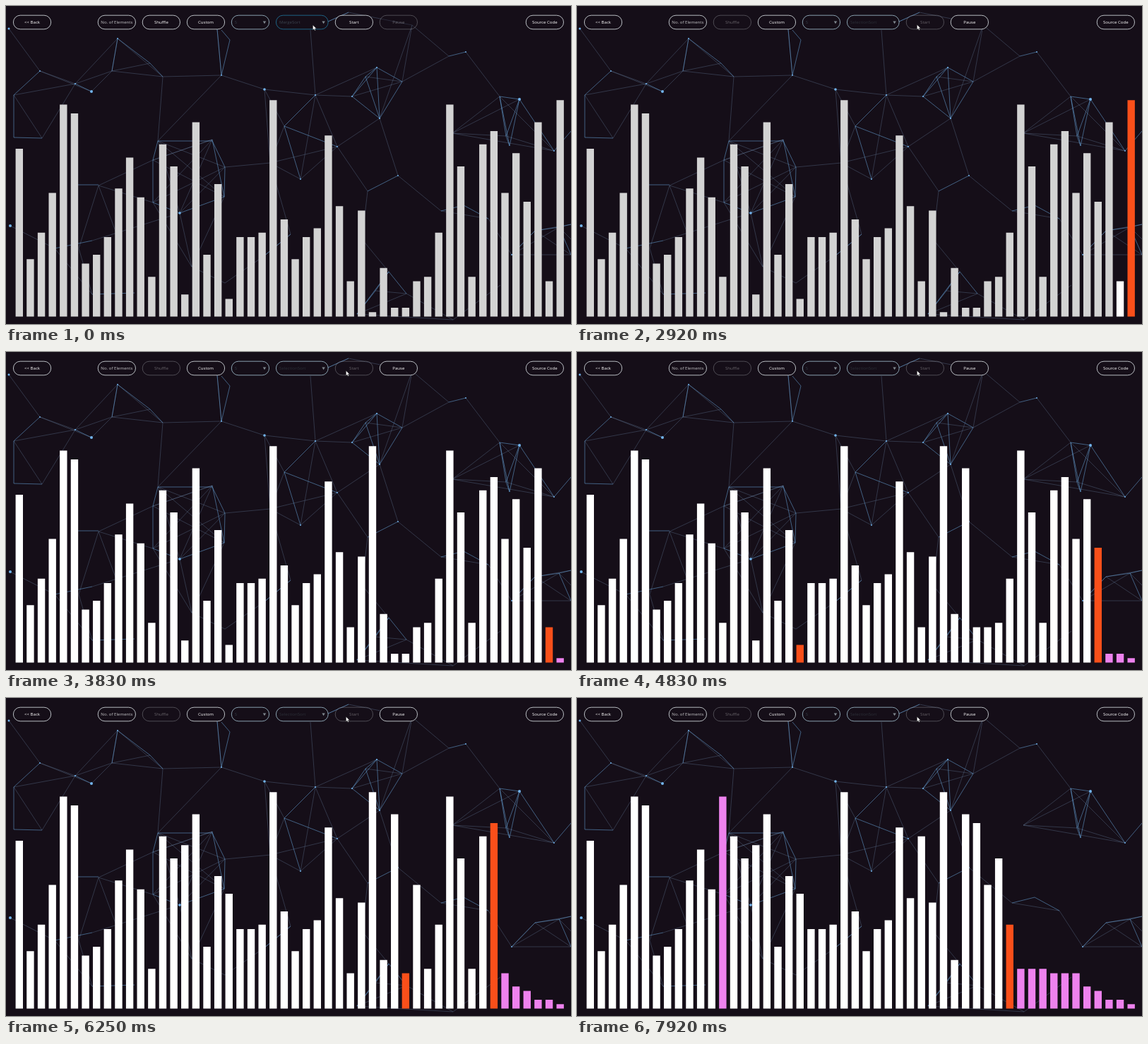
Recreate the animation shown at these times as an HTML page. Size 800 by 450 pixels, loop 8000 ms.

```html
<!DOCTYPE html>
<html lang="en">
<head>
<meta charset="utf-8">
<title>Sorting visualizer</title>
<style>
  html, body { margin: 0; width: 100%; height: 100%; overflow: hidden; background: #150e18; }
  svg { display: block; width: 100vw; height: 100vh; }
  text { font: 6.1px "Open Sans", "Noto Sans", sans-serif; fill: #fff; }
  .net path { fill: none; stroke-width: .8; }
  .dim { stroke: #6c87a8; opacity: .42; }
  .lit { stroke: #68a6dc; opacity: .68; }
</style>
</head>
<body>
<svg id="stage" viewBox="0 0 800 450">
  <rect width="800" height="450" fill="#150e18"/>
  <g class="net">
    <!-- upper left -->
    <path class="dim" d="M4 32L48 92L98 110L51 187L11 126L98 110L158 46L150 92M98 110L150 92L222 100L158 46M121 121L150 92L204 81M121 121L48 92M222 100L305 98L366 118M222 100L215 191M305 98L299 33M305 98L215 191"/>
    <path class="lit" d="M48 92L11 126V186L51 187M98 110L121 121M150 92L158 46L204 81L222 100M305 34L317 48L305 98L299 33"/>
    <!-- centre -->
    <path class="dim" d="M431 34L438 126L366 118L394 170L374 222L417 245L438 126L469 199L417 245M366 118L374 222L469 199M374 222L310 228M438 126L490 128L561 107M438 126L525 87M469 199L529 159L575 27L561 107M469 199L512 262L504 330M529 159L555 240L616 290M509 100L561 107M456 22L485 9L575 27L627 71"/>
    <path class="lit" d="M438 126L394 170L469 199M394 170L417 245M490 128L525 87L509 100L490 128L529 159L561 107L525 87L529 159L509 100M555 240L512 262M456 22L485 9"/>
    <!-- right -->
    <path class="dim" d="M561 107L627 71M651 65L699 128L632 180L727 132M632 180L708 184L776 205L632 180M699 128L776 205M616 290L683 301L716 352L749 318L800 352H716L783 313L800 330M749 318L800 309"/>
    <path class="lit" d="M627 71L651 65M699 128L727 132L708 184L699 128L713 198L727 132L776 205L800 177M708 184L713 198M616 290L648 282L683 301M716 352L749 318L783 313L800 309M783 313L800 352"/>
    <!-- middle ring -->
    <path class="dim" d="M215 191L310 228L208 278L292 189L208 218L309 270L215 191L246 293L310 228M208 218L292 189L246 293L263 369L309 270M131 254L208 218M131 254L208 278M246 293L122 332M263 369L310 392M263 369L208 278"/>
    <path class="lit" d="M215 191H292L310 228L309 270L246 293L208 278V218L215 191M292 189L309 270"/>
    <!-- lower edge -->
    <path class="dim" d="M6 311L69 343L122 408M131 254L103 343L122 408M131 254L160 332M365 354L403 323L374 222M365 354L310 392M542 376L504 330M497 436L567 407L633 444L700 395M567 407L523 403M497 436L633 444"/>
    <path class="lit" d="M100 253H131M69 343L122 332M122 408L182 406M365 354L403 323M497 436L542 376L567 407M497 436L523 403L542 376"/>
  </g>
  <g id="dots" fill="#72b4ee"></g>
  <g id="bars"></g>
  <g id="controls"></g>
  <path id="cursor" d="M0 0V6.8L1.6 5.4L2.7 7.8L3.8 7.3L2.7 5H4.9Z" fill="#fff" stroke="#111" stroke-width=".3"/>
</svg>
<script>
const LOOP = 8000, FPS = 12, BASE = 439.5, UNIT = 6.25;
const GREY = "#d3d3d3", WHITE = "#fff", ORANGE = "#fa4f1a", PINK = "#ee82ee";
const BG = "#150e18", EDGE = "#dfe6ea", HOVER = "#21789f";

const values = [38, 13, 19, 28, 48, 46, 12, 14, 18, 29, 36, 27, 9, 39, 34, 5, 44, 14, 30, 4, 18, 18, 19, 49, 22,
  13, 18, 20, 41, 25, 8, 24, 1, 11, 2, 2, 8, 9, 19, 48, 34, 9, 39, 42, 28, 37, 26, 44, 8, 49];
// Start of each selection pass; a short rest precedes every scan but the first.
const passes = [2912, 3630, 4070, 4500, 4965, 5455, 5860, 6275, 6690, 7105, 7515, 7912, 8310];
const REST = 130;
// Pointer stops: time, x, y
const pointer = [[0, 434.5, 27], [500, 434.5, 27], [1000, 441, 44.5], [1170, 441, 44.5],
  [2000, 504, 32], [2500, 484, 30], [2600, 484, 30], [2750, 481.5, 26.5]];

const $ = id => document.getElementById(id);
function add(parent, tag, attrs, text) {
  const node = document.createElementNS("http://www.w3.org/2000/svg", tag);
  for (const key in attrs) node.setAttribute(key, attrs[key]);
  if (text) node.textContent = text;
  return parent.appendChild(node);
}

for (const [cx, cy, r] of [[4, 32, 1.5], [121, 121, 2], [366, 118, 1.8], [727, 132, 2], [6, 311, 2], [246, 293, 1.8],
  [48, 92, .9], [98, 110, 1.1], [158, 46, .9], [305, 98, .9], [438, 126, 1.1], [490, 128, 1], [525, 87, 1],
  [529, 159, 1], [417, 245, .9], [469, 199, .9], [555, 240, .9], [651, 65, .9], [776, 205, .9], [716, 352, .9]])
  add($("dots"), "circle", { cx, cy, r });

const bars = values.map((_, i) => add($("bars"), "rect", { x: 13.6 + 15.63 * i, width: 10.4 }));

function button(x, label, width = 53.3) {
  const group = add($("controls"), "g");
  const box = add(group, "rect", { x, y: 13.2, width, height: 19.6, rx: 9.8, fill: BG, stroke: EDGE, "stroke-width": .8 });
  add(group, "text", { x: x + width / 2, y: 25.2, "text-anchor": "middle" }, label);
  return { group, box };
}
function select(x, width, label) {
  const { group, box } = button(x, "", width);
  const text = group.querySelector("text");
  text.setAttribute("x", x + 4.5);
  text.setAttribute("text-anchor", "start");
  text.textContent = label;
  text.style.fill = "#343a45";
  const right = x + width - 8.8;
  add(group, "path", { d: `M${right} 21.6h4.4l-2.2 3.6z`, fill: "#7f878e" });
  box.setAttribute("stroke", "#a5c3d2");
  return { box, text };
}
button(10.4, "<< Back");
button(130.2, "No. of Elements").group.querySelector("text").style.fill = "#c4c4c6";
const shuffle = button(193.2, "Shuffle");
button(256.3, "Custom");
select(319.3, 53.3, "S");
const algorithm = select(382.4, 73.8, "MergeSort");
const start = button(466.2, "Start");
const pause = button(529.2, "Pause");
button(736.2, "Source Code");

function sortState(t) {
  const v = values.slice(), color = v.map(() => GREY);
  let swapped = v.length;
  for (let p = 0; p < passes.length - 1 && t >= passes[p]; p++) {
    const i = v.length - 1 - p, end = passes[p + 1];
    const scanStart = passes[p] + (p ? REST : 0);
    const step = (end - scanStart) / i;
    const done = t >= end ? i : Math.max(0, Math.floor((t - scanStart) / step));
    color[i] = ORANGE;
    if (t >= scanStart) {
      if (swapped < i) color[swapped] = WHITE;
      if (done < i) color[i - 1 - done] = WHITE;
    }
    let min = i;
    for (let j = i - 1; j >= i - done; j--) {
      color[j] = WHITE;
      if (v[j] < v[min]) {
        if (min !== i) color[min] = WHITE;
        min = j;
        color[j] = ORANGE;
      }
    }
    if (t >= end) {
      [v[i], v[min]] = [v[min], v[i]];
      color[i] = color[min] = PINK;
      swapped = min;
    }
  }
  return { v, color };
}

function pointerAt(t) {
  const n = pointer.findIndex(stop => stop[0] > t);
  if (n < 0) return pointer[pointer.length - 1].slice(1);
  const [t0, x0, y0] = pointer[n - 1], [t1, x1, y1] = pointer[n];
  const k = (t - t0) / (t1 - t0), e = k * k * (3 - 2 * k);
  return [x0 + (x1 - x0) * e, y0 + (y1 - y0) * e];
}

function draw(time) {
  const t = Math.floor((time % LOOP + 4) * FPS / 1000) * 1000 / FPS;
  const { v, color } = sortState(t);
  bars.forEach((bar, i) => {
    bar.setAttribute("y", BASE - v[i] * UNIT);
    bar.setAttribute("height", v[i] * UNIT);
    bar.setAttribute("fill", color[i]);
  });

  const running = t >= passes[0], [x, y] = pointerAt(t);
  shuffle.group.setAttribute("opacity", running ? .35 : 1);
  start.group.setAttribute("opacity", running ? .35 : 1);
  pause.group.setAttribute("opacity", running ? 1 : .35);
  start.box.setAttribute("stroke", !running && x > 466 ? HOVER : EDGE);
  algorithm.box.setAttribute("stroke", x < 456 ? HOVER : "#a5c3d2");
  algorithm.text.textContent = t < 1245 ? "MergeSort" : "SelectionSort";
  algorithm.text.style.fill = running ? "#2c3038" : "#3b434e";
  $("cursor").setAttribute("transform", `translate(${x} ${y})`);
}

const origin = performance.now();
function tick() {
  draw(performance.now() - origin);
  requestAnimationFrame(tick);
}
tick();
</script>
</body>
</html>
```
